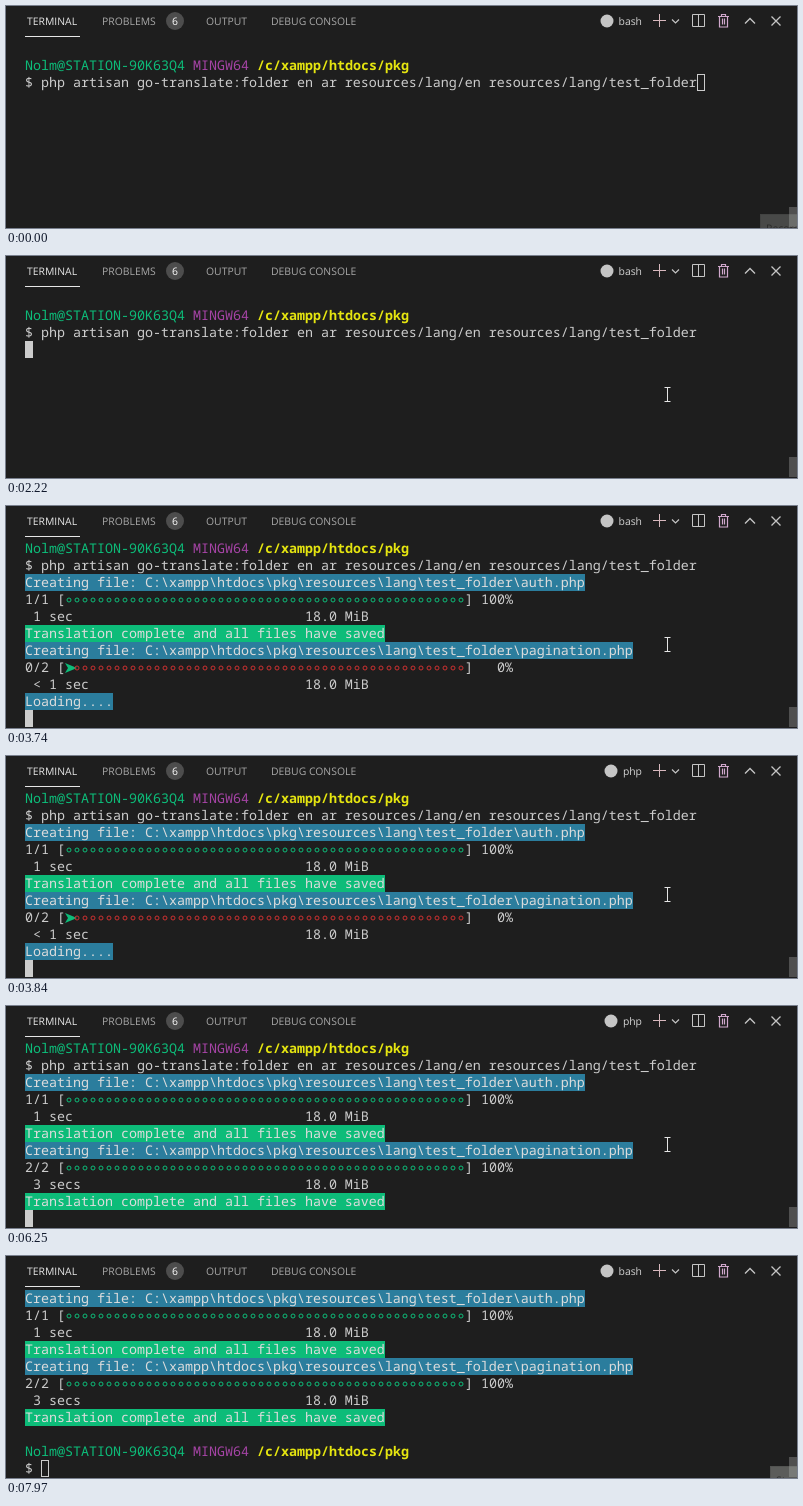
Write an HTML page that moves like this. It is 791 px wide and 222 px high and loops after 8.07 s.

```html
<!DOCTYPE html>
<html lang="en">
<head>
<meta charset="utf-8">
<title>Terminal</title>
<style>
  html, body { margin: 0; width: 100%; height: 100%; overflow: hidden; background: #1e1e1e; }
  svg { display: block; }
  text { white-space: pre; text-rendering: geometricPrecision; }
  .ui { font: 500 10.4px "Open Sans", "Noto Sans", sans-serif; fill: #a8a8a8; }
  .mono { font: 500 13.333px "Noto Sans Mono", "DejaVu Sans Mono", monospace; fill: #ccc; }
  .icon { fill: none; stroke: #c5c5c5; stroke-width: 1; }
</style>
</head>
<body>
<svg width="791" height="222" viewBox="0 0 791 222">
  <rect width="791" height="222" fill="#1e1e1e"/>
  <g class="ui">
    <text x="21" y="19" fill="#e7e7e7">TERMINAL</text>
    <text x="96" y="19">PROBLEMS</text>
    <text x="200" y="19">OUTPUT</text>
    <text x="265" y="19">DEBUG CONSOLE</text>
    <circle cx="169" cy="15" r="9" fill="#4d4d4d"/>
    <text x="169" y="19" text-anchor="middle" fill="#fff">6</text>
    <text id="shell" x="636" y="19" text-anchor="end" fill="#d4d4d4"></text>
  </g>
  <rect x="19" y="30" width="55" height="1" fill="#e7e7e7"/>
  <circle id="shellIcon" cy="15" r="6.5" fill="#c5c5c5"/>
  <g class="icon">
    <path d="M647 14.5h13M653.5 8v13" stroke="#d8b8be"/>
    <path d="M666 13.5l3.5 3.5 3.5-3.5" stroke-width="1.2"/>
    <path d="M686.5 8.5h12v12h-12zM692.5 8.5v12"/>
    <path d="M712 10.5h11M715.5 10V8.5h4V10M713.5 10.5v10.500h8V10.5M716.500 12.5v6M718.500 12.5v6" stroke="#d0a8cc" stroke-width="1.2"/>
    <path d="M739 17.5l5-5 5 5" stroke-width="1.3"/>
    <path d="M765.5 10.5l9 9M774.5 10.5l-9 9" stroke-width="1.3"/>
  </g>
  <g id="screens" class="mono"></g>
  <rect x="783" y="201" width="8" height="20" fill="#4f4f4f"/>
  <g id="button">
    <rect x="754.5" y="208.5" width="40" height="20" fill="#b6bab4" stroke="#a0a49e"/>
    <text id="buttonLabel" class="ui" x="760" y="226" style="fill:#444"></text>
  </g>
  <path id="mouse" d="M-3 -7h6M0 -7v14M-3 7h6" fill="none" stroke="#e4e4e4"/>
</svg>
<script>
const LOOP = 8070, CELL = 8, LINE = 17, LEFT = 19;
const GREEN = "#0dbc79", RED = "#cd3131", BLUE = "#2b7d9d";
const byId = id => document.getElementById(id);

function add(parent, tag, attrs, content = "") {
  const node = document.createElementNS("http://www.w3.org/2000/svg", tag);
  for (const key in attrs) node.setAttribute(key, attrs[key]);
  node.textContent = content;
  return parent.appendChild(node);
}

// Row makers: each returns a function that draws itself at a given line top.
const spans = (...parts) => (g, top) => {
  let col = 0;
  for (const [content, color = "#ccc", back, weight = 500] of parts) {
    const x = LEFT + col * CELL;
    if (back) add(g, "rect", { x, y: top, width: content.length * CELL, height: LINE, fill: back });
    add(g, "text", { x, y: top + 13, fill: color, "font-weight": weight }, content);
    col += content.length;
  }
};
const plain = content => spans([content]);
const label = (content, back) => spans([content, "#dcdcdc", back]);
const usage = time => plain(time.padEnd(35) + "18.0 MiB");

const progress = (done, total) => (g, top) => {
  const ratio = done / total, filled = ratio * 50, y = top + 9;
  plain(`${done}/${total} [`)(g, top);
  add(g, "text", { x: LEFT + 55 * CELL, y: top + 13 }, `] ${String(ratio * 100).padStart(3)}%`);
  for (let i = 0; i < 50; i++) {
    const x = LEFT + (5 + i) * CELL;
    if (i === filled) add(g, "path", { d: `M${x} ${y - 5}l12 5-12 5 3-5z`, fill: GREEN });
    else add(g, "circle", { cx: x + 4, cy: y, r: 2, fill: "none", stroke: i < filled ? GREEN : RED });
  }
};

const blank = plain("");
const prompt = spans(["Nolm@STATION-90K63Q4 ", GREEN], ["MINGW64 ", "#a544a5"], ["/c/xampp/htdocs/pkg", "#e5e510", null, 650]);
const command = plain("$ php artisan go-translate:folder en ar resources/lang/en resources/lang/test_folder");
const creating = file => label(`Creating file: C:\\xampp\\htdocs\\pkg\\resources\\lang\\test_folder\\${file}.php`, BLUE);
const loading = label("Loading....", BLUE);
const complete = label("Translation complete and all files have saved", GREEN);
const success = label("Translation success", GREEN);

const start = [prompt, command];
const auth = [creating("auth"), progress(1, 1), usage(" 1 sec"), complete];
const pages = (done, time, status) => [creating("pagination"), progress(done, 2), usage(time), status];
const firstFile = done => [...start, creating("auth"), progress(done, 1), usage(" < 1 sec"), loading];
const bothFiles = (...args) => [...start, ...auth, ...pages(...args)];
const finished = [...auth, ...pages(2, " 3 secs", complete), blank, prompt, plain("$ ")];

// time, first line top, rows, cursor column, cursor line, hollow cursor
const screens = [
  [0, 51, start, 84, 1, true],
  [1420, 51, start, 84, 1],
  [2220, 51, start, 0, 2],
  [2520, 51, firstFile(0), 0, 6],
  [2720, 51, firstFile(1), 0, 6],
  [3640, 51, [...start, ...auth], 0, 6],
  [3740, 34, bothFiles(0, " < 1 sec", loading), 0, 10],
  [4040, 34, bothFiles(1, " < 1 sec", loading), 0, 10],
  [5260, 34, bothFiles(2, " 2 secs", success), 0, 10],
  [6250, 34, bothFiles(2, " 3 secs", complete), 0, 10],
  [6350, 34, finished, 2, 10],
  [7970, 34, finished, 2, 10, true]
];

const groups = screens.map(([, top, rows, col, line, hollow]) => {
  const g = add(byId("screens"), "g", {});
  rows.forEach((row, i) => row(g, top + i * LINE));
  const x = LEFT + col * CELL, y = top + line * LINE;
  add(g, "rect", hollow
    ? { x: x + .5, y: y + .5, width: 7, height: 16, fill: "none", stroke: "#ccc" }
    : { x, y, width: 8, height: LINE, fill: "#ccc" });
  return g;
});

const shells = [[0, "bash", 601], [3840, "php", 605], [7050, "bash", 601]];

// time, x, y; no position means the pointer is off stage
const pointer = [
  [0], [1200, 686.5, 186.5], [1300, 672.5, 161.5], [1420, 650.5, 140.5],
  [1520, 661.5, 137.5], [1720, 661.5, 138.5], [6950, 666.5, 146.5],
  [7050, 682.5, 163.5], [7150, 706.5, 182.5], [7270, 731.5, 201.5],
  [7370, 747.5, 212.5], [7470]
];

// time, opacity, label, x offset, y offset
const buttons = [
  [0, .28, "Record", 0, 0], [100, .28, "Stop", 0, 0], [400, .5, "Stop", 0, 0],
  [500, .75, "Stop", 0, 0], [600, 1, "Stop", 0, 0], [1300, .5, "Stop", 0, 0],
  [1420, 0, "", 0, 0], [7970, .4, "Stop", 10, 2]
];

const indexAt = (steps, t) => steps.findLastIndex(step => step[0] <= t);
const stepAt = (steps, t) => steps[indexAt(steps, t)];

function render(t) {
  const current = indexAt(screens, t);
  groups.forEach((g, i) => g.setAttribute("display", i === current ? "inline" : "none"));

  const [, name, iconX] = stepAt(shells, t);
  byId("shell").textContent = name;
  byId("shellIcon").setAttribute("cx", iconX);

  const [, x = -50, y = -50] = stepAt(pointer, t);
  byId("mouse").setAttribute("transform", `translate(${x} ${y})`);

  const [, opacity, caption, dx, dy] = stepAt(buttons, t);
  byId("button").setAttribute("opacity", opacity);
  byId("button").setAttribute("transform", `translate(${dx} ${dy})`);
  byId("buttonLabel").textContent = caption;
}

const origin = performance.now();
function tick() {
  render((performance.now() - origin) % LOOP);
  requestAnimationFrame(tick);
}
tick();
</script>
</body>
</html>
```
